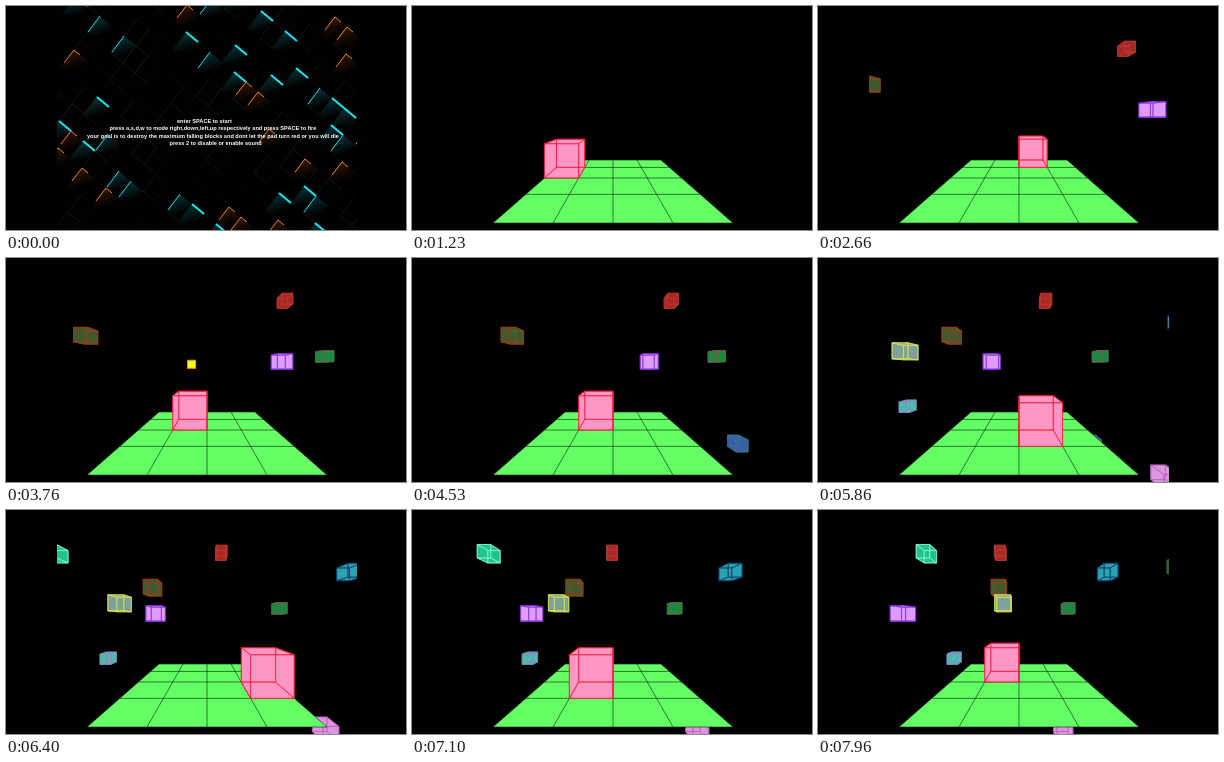
An HTML page that plays this animation: 400x224 px, repeating every 8000 ms.

```html
<!DOCTYPE html>
<html lang="en">
<head>
<meta charset="utf-8">
<title>Falling blocks</title>
<style>
  html, body { margin: 0; width: 100%; height: 100%; overflow: hidden; background: #000; }
  svg { display: block; width: 100vw; height: 100vh; }
  text { font: bold 5.62px "Liberation Sans", Arial, sans-serif; fill: #fff; }
</style>
</head>
<body>
<svg viewBox="0 0 400 224">
  <clipPath id="view"><rect x="51" width="300" height="224"/></clipPath>
  <linearGradient id="cyanGlow" x2="0.3" y2="1">
    <stop stop-color="#0c3c42"/><stop offset="0.8" stop-color="#000"/>
  </linearGradient>
  <linearGradient id="orangeGlow" x2="0.3" y2="1">
    <stop stop-color="#3a1a06"/><stop offset="0.8" stop-color="#000"/>
  </linearGradient>
  <rect width="400" height="224"/>
  <g clip-path="url(#view)">
    <g id="title">
      <g id="tiles"></g>
      <g id="neon" fill="none"></g>
      <text x="171" y="117">enter SPACE to start</text>
      <text x="103.5" y="124.4">press a,s,d,w to mode right,down,left,up respectively and press SPACE to fire</text>
      <text x="81" y="131.8">your goal is to destroy the maximum falling blocks and dont let the pad turn red or you will die</text>
      <text x="163.5" y="139.2">press 2 to disable or enable sound</text>
    </g>
    <g id="game">
      <g id="blocks"></g>
      <g id="pad"></g>
      <rect id="shot" x="181.5" width="8" height="8" fill="#ffff1e" stroke="#ff8c00"/>
      <path id="player" fill="#ff96c4" stroke="#f81e3c" stroke-width="0.7"/>
    </g>
  </g>
</svg>
<script>
const LOOP = 8000, START = 760;
const VX = 201, VY = 112;            // vanishing point
const DEPTH = 0.00625;               // perspective loss per cell of depth
const SPAWN = 12.2;                  // spawn distance in cells
const $ = id => document.getElementById(id);

function add(parent, tag, attrs) {
  const el = document.createElementNS("http://www.w3.org/2000/svg", tag);
  for (const k in attrs) el.setAttribute(k, attrs[k]);
  return parent.appendChild(el);
}

// ---- title screen: slanted tiles, some with a lit edge ----
let seed = 7;
const rnd = () => (seed = seed * 16807 % 2147483647) / 2147483647;

function tile(x, y) {
  const warm = Math.sin((x - y) / 22) + rnd() * 2 - 1.3 > 0;
  const dim = Math.hypot((x - VX) / 110, (y - 115) / 50) < 1;
  const color = warm ? "#f08426" : "#1ce0ea";
  const lit = rnd() < (dim ? 0.1 : 0.3);
  add($("tiles"), "path", {
    d: `M${x} ${y}l12 10l-13 17l-12 -10z`,
    fill: lit ? `url(#${warm ? "orange" : "cyan"}Glow)` : "#010101",
    stroke: rnd() < 0.25 ? "#2a221c" : "#060708", "stroke-width": 0.5
  });
  if (lit) {
    const long = rnd() < 0.35;
    const d = `M${x} ${y}` + (warm ? "m-10 13l10 -13l6 5" : long ? "l-12 16" : "l12 10");
    add($("neon"), "path", { d, stroke: color, "stroke-width": warm || long ? 1 : 2.2 });
  }
}

for (let i = 0; i < 34; i++) {
  for (let j = -18; j < 18; j++) {
    const x = 10 + i * 12 + j * 13, y = -60 + i * 10 - j * 17;
    if (x > 35 && x < 365 && y > -30 && y < 240) tile(x, y);
  }
}

// ---- pad: four by four cells in perspective ----
const half = row => 1 / (1 / 48 - DEPTH / 2 * row);
const padPoint = (col, row) => [VX + (col - 2) * half(row) / 2, VY + half(row) * 0.875];

add($("pad"), "polygon", {
  points: [[0, 0], [4, 0], [4, 4], [0, 4]].map(p => padPoint(...p)).join(" "), fill: "#64ff64"
});
const gridLine = (a, b) => `M${padPoint(...a)}L${padPoint(...b)}`;
let grid = "";
for (let i = 0; i <= 4; i++) grid += gridLine([i, 0], [i, 4]) + gridLine([0, i], [4, i]);
add($("pad"), "path", { d: grid, stroke: "#052005", "stroke-width": 0.6 });

// ---- cubes ----
function face(pts) {
  let area = 0;
  pts.forEach(([x, y], i) => {
    const [nx, ny] = pts[(i + 1) % 4];
    area += x * ny - nx * y;
  });
  if (area < 0) pts.reverse();       // same winding, so overlaps stay filled
  return "M" + pts.map(p => p.map(v => v.toFixed(2))).join("L") + "Z";
}

// Front face at x, y with side s; the back face lies one cell deeper.
function cube(x, y, s) {
  const r = 1 / (1 + DEPTH * s);
  const front = [[x, y], [x + s, y], [x + s, y + s], [x, y + s]];
  const back = front.map(([px, py]) => [VX + (px - VX) * r, VY + (py - VY) * r]);
  let d = face([...back]);
  for (let i = 0; i < 4; i++) {
    const j = (i + 1) % 4;
    d += face([front[i], front[j], back[j], back[i]]);
  }
  return d + face([...front]);
}

// Each block passes the centre line once the shared travel reaches `cross`.
const block = (y, s, speed, cross, fill, stroke) => ({
  y, s, speed, cross, el: add($("blocks"), "path", { fill, stroke, "stroke-width": 0.7 })
});
const blocks = [
  block(35.2, 11, -0.5, 211, "#ac2626", "#b43c30"),
  block(69.3, 14.5, 0.53, 313, "#3f5a2c", "#96401f"),
  block(95.7, 15.5, -1, 131.5, "#de9cff", "#8c30e0"),
  block(92.6, 11, -0.356, 387, "#148c40", "#5c6c48"),
  block(84.8, 16, 1.105, 282.4, "#7ea29a", "#dce24c"),
  block(182, 12, -0.8, 255.6, "#3c5caa", "#33788c"),
  block(34.5, 13.5, 0.905, 374, "#1fc48c", "#84f5cc"),
  block(53.2, 14, -0.824, 363.7, "#2aa2b0", "#123c68"),
  block(144, 10.5, 0.517, 399.6, "#48bfae", "#8c88c0"),
  block(216.5, 16, -1.152, 293.3, "#dc96e0", "#c060c0"),
  block(45, 14, -0.8, 461.5, "#2c5a34", "#3c6a44")
];

// One key every 200 ms; a dot is a pause.
const KEYS = ".a..d.d.w" + "..sa." + "....dw.." + ".ssd.." + ".aa" + "..w.";

function cell(t) {
  let col = 1, row = 1;
  for (const k of KEYS.slice(0, Math.max(0, Math.floor((t - 800) / 200)))) {
    col += (k === "d") - (k === "a");
    row += (k === "s") - (k === "w");
  }
  return [col, row];
}

const show = (el, on) => { el.style.display = on ? "" : "none"; };

function draw(t) {
  show($("title"), t < START);
  show($("game"), t >= START);
  if (t < START) return;

  const dt = t - 2660;
  const travel = 0.0572 * dt - 1.525e-6 * dt * dt;   // the game slows as blocks pile up
  for (const b of blocks) {
    const x = VX + b.speed * (travel - b.cross);
    const on = (VX - x) * Math.sign(b.speed) < SPAWN * b.s;
    show(b.el, on);
    if (on) b.el.setAttribute("d", cube(x, b.y, b.s));
  }

  const [col, row] = cell(t);
  const [px, py] = padPoint(col, row + 1), size = half(row + 1) / 2;
  $("player").setAttribute("d", cube(px, py - size, size));

  show($("shot"), t >= 3560 && t < 4230);
  $("shot").setAttribute("y", 102.5 - 0.225 * (t - 3760));
}

function tick() {
  draw(performance.now() % LOOP);
  requestAnimationFrame(tick);
}
tick();
</script>
</body>
</html>
```
